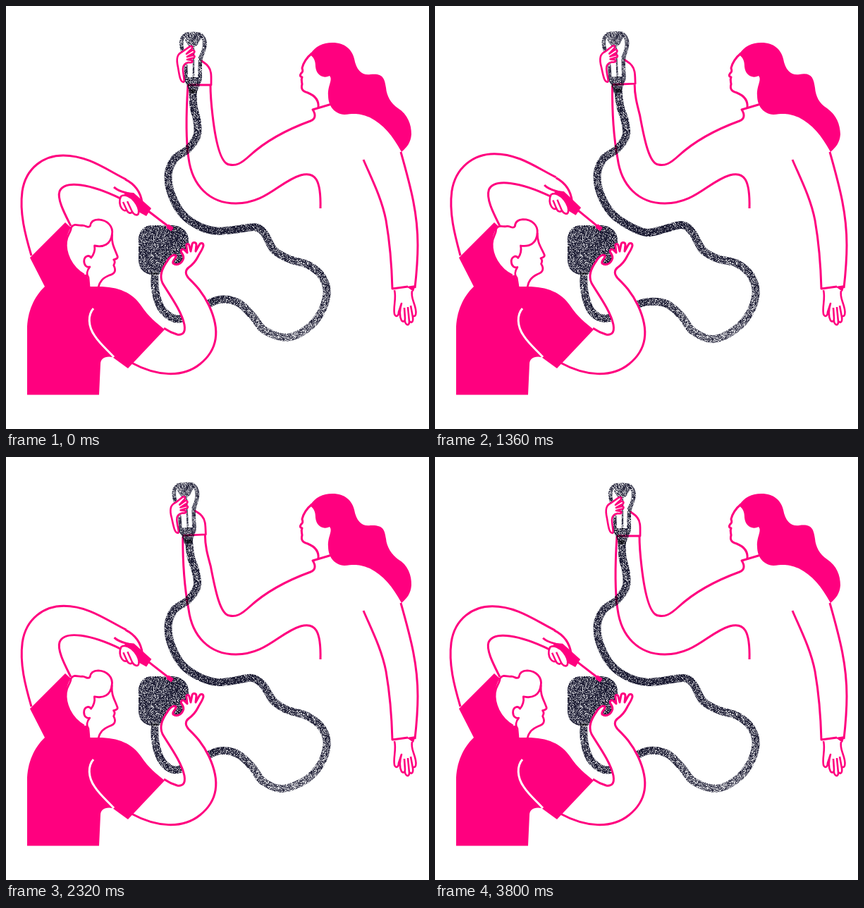
Recreate the animation shown at these times as an HTML page with a canvas. Size 600x600 px, loop 3.84 s.

```html
<!DOCTYPE html>
<html lang="en">
<head>
<meta charset="utf-8">
<title>Lamp and cable</title>
<style>
  html, body { margin: 0; width: 100%; height: 100%; overflow: hidden; background: #fff; }
  canvas { display: block; width: 600px; height: 600px; }
</style>
</head>
<body>
<canvas id="stage" width="600" height="600"></canvas>
<script>
const LOOP = 3840, STEP = 40, TAU = Math.PI * 2;
const PINK = '#ff007f', WHITE = '#fff';
const ctx = document.getElementById('stage').getContext('2d');

// Cable points: rest position and offset at the far end of the sway.
const CABLE = [
  [265, 118, 0, 0], [266, 142, 0, 0], [271, 163, 0, 0], [271, 184, 0, 0],
  [258, 203, 0, 0], [239, 217, -1, 0], [230, 240, 0, 0], [235, 268, 0, -1],
  [251, 296, 0, -2], [275, 313, 2, -1], [300, 319, 1, 3], [327, 317, -2, -1],
  [354, 314, -9, -4], [367, 323, -5, -2], [380, 346, -1, 0], [402, 359, -5, -1],
  [430, 368, -4, -3], [449, 385, -1, -2], [455, 408, 0, 0], [446, 436, 0, 0],
  [427, 458, -3, 1], [399, 470, -12, 3], [367, 460, -4, 1], [350, 440, -1, 0],
  [330, 421, -2, 2], [304, 416, 0, 4], [280, 426, 0, 0], [246, 444, -6, -1],
  [222, 431, -1, 2], [212, 405, 0, 0], [211, 378, 0, 0]
];

// Dark grainy ink, lighter at the lamp and along the lower bend.
function makeInk() {
  const c = document.createElement('canvas');
  c.width = c.height = 600;
  const g = c.getContext('2d'), img = g.createImageData(600, 600);
  const spot = (x, y, cx, cy, r) => Math.exp(-((x - cx) ** 2 + (y - cy) ** 2) / (r * r));
  let seed = 7;
  const rand = () => (seed = (seed * 1664525 + 1013904223) >>> 0) / 4294967296;
  for (let i = 0; i < 360000; i++) {
    const x = i % 600, y = i / 600 | 0;
    const light = 0.27 + 0.2 * spot(x, y, 405, 470, 65) + 0.12 * spot(x, y, 262, 55, 45)
      - 0.1 * spot(x, y, 300, 318, 60);
    const v = rand() ** (1 / light - 1);
    img.data.set([22 + 233 * v, 22 + 233 * v, 46 + 209 * v, 255], i * 4);
  }
  g.putImageData(img, 0, 0);
  return ctx.createPattern(c, 'no-repeat');
}
const ink = makeInk();

function line(d, color = PINK, width = 3) {
  ctx.strokeStyle = color;
  ctx.lineWidth = width;
  ctx.stroke(new Path2D(d));
}
function fill(d, color = PINK) {
  ctx.fillStyle = color;
  ctx.fill(new Path2D(d), 'evenodd');
}
function shape(d, width = 3) {
  fill(d, WHITE);
  line(d, PINK, width);
}
function turned(x, y, angle, draw, dx = 0, dy = 0) {
  ctx.save();
  ctx.translate(x + dx, y + dy);
  ctx.rotate(angle);
  ctx.translate(-x, -y);
  draw();
  ctx.restore();
}
const sway = (t, period, lag = 0) => (1 - Math.cos(TAU * (t - lag) / period)) / 2;

function woman(s, t) {
  const w = 1.2 * Math.sin(TAU * t / 1920);
  line('M434,67 C428,72 422,80 420,88 C421,91 421,93 420,94 C416,98 417,100 420,101 C418,105 420,108 420,111 C418,118 421,121 428,123 C438,127 444,134 443,144');
  fill(`M431,69 C439,57 449,52 463,52 C481,52 491,62 494,75 C497,92 506,99 517,97
    C534,${95 + w} 537,102 539,116 C540,128 ${546 + w},138 556,145
    C570,${154 - w} ${575 + w / 2},168 575,182 C574,194 569,200 561,207
    C548,183 535,168 516,158 C499,151 492,153 480,154 C466,153 457,142 457,127
    C456,113 464,105 459,99 C449,104 440,97 439,86 C439,78 437,73 431,69Z`);
  const x = 290 - 8.5 * s, y = 112 - s;
  line(`M462,139 L435,147 C439,153 440,160 432,163 C399,175 368,192 346,212
    C333,224 326,227 317,225 C304,224 297,190 ${293 - 3 * s},155 C${291 - 6 * s},138 ${x},126 ${x},${y}`);
  line(`M${258 - 8 * s},${112 + s} C${255 - 5 * s},160 ${255 - s},190 259,216
    C264,254 288,280 326,280 C369,280 388,249 418,240 C439,234 447,247 446,287`);
  line('M560,207 C575,260 584,295 584,339 C584,360 582,382 580,400');
  line('M507,218 C519,246 533,273 539,304 C544,333 547,362 548,401 L570,398');
  fill('M568,398 L581,396 L578,405Z');
  line('M551,403 C554,415 549,427 551,437 C553,442 557,440 557,434 L561,422 C558,432 558,440 561,446 C564,449 566,447 566,443 L565,428 M566,443 C565,453 572,455 572,448 L570,427 M572,447 C576,451 578,447 577,441 L574,425 M577,440 C582,441 582,435 581,430 C579,419 574,414 576,404', PINK, 2.6);
}

function inHand(s, draw) {
  turned(274, 112, -0.055 * s, draw, -8.5 * s, -1.5 * s);
}

function palm() {
  line('M258,112 L291,112 C291,101 292,92 287,86 C284,81 279,80 277,77', PINK, 2.8);
}

function lamp() {
  fill('M253,38 Q265,35 277,38 Q285,44 285,54 C284,66 278,72 278,82 L278,106 Q275,110 274,114 L270,124 L260,124 L257,112 L253,107 L253,82 C252,70 246,64 246,53 Q246,43 253,38Z M253,46 C250,53 252,64 257,73 L258,101 L272,101 L273,73 C278,64 281,54 277,46 C274,49 273,55 268,58 L261,58 C256,55 255,49 253,46Z', ink);
  line('M266,58 L266,103', ink, 2.5);
}

function fingers() {
  shape('M252,108 C247,108 246,99 244,87 C241,74 243,68 250,65 C255,62 259,58 262,57 C266,57 264,61 261,63 L256,68 L264,63 C268,62 269,66 264,68 L257,72 L265,70 C269,70 268,74 264,74 L257,76 L263,77 C267,79 263,81 259,80 C254,81 251,84 251,89 C251,97 254,107 252,108Z', 2.6);
}

function cable(s, t) {
  const pts = CABLE.map(([x, y, dx, dy], i) => {
    const hold = Math.max(0, 1 - i / 3);
    return [x + dx * sway(t, 1920, -150) - 6.5 * s * hold,
      y + dy * sway(t, 1920, 150) - 1.5 * s * hold];
  });
  const at = i => pts[Math.max(0, Math.min(pts.length - 1, i))];
  ctx.beginPath();
  ctx.moveTo(...pts[0]);
  for (let i = 0; i < pts.length - 1; i++) {
    const [a, b, c, d] = [at(i - 1), at(i), at(i + 1), at(i + 2)];
    ctx.bezierCurveTo(b[0] + (c[0] - a[0]) / 6, b[1] + (c[1] - a[1]) / 6,
      c[0] - (d[0] - b[0]) / 6, c[1] - (d[1] - b[1]) / 6, c[0], c[1]);
  }
  ctx.strokeStyle = ink;
  ctx.lineWidth = 11;
  ctx.stroke();
}

function device() {
  fill('M207,311 L236,311 C250,312 259,320 259,333 L259,350 C258,360 252,366 242,367 L226,374 Q220,382 209,382 C197,380 188,374 188,360 L188,331 C188,320 195,311 207,311Z', ink);
}

function lowArm() {
  shape('M178,506 C213,525 250,528 275,508 C304,485 302,455 288,425 C278,404 267,394 259,386 C254,380 254,375 259,371 C266,366 269,362 272,356 C275,350 279,345 280,340 C280,336 276,335 274,339 L269,348 L270,339 C270,335 265,334 264,338 L262,348 L260,340 C259,336 255,337 256,341 L257,350 L253,346 C250,343 247,347 249,350 C252,354 253,357 251,360 C248,367 241,368 237,365 C235,361 242,358 241,354 C237,351 231,357 228,363 C222,372 217,382 222,393 C230,407 249,432 253,452 C255,464 250,467 243,466 C236,464 230,461 224,457');
}

function shirt() {
  fill('M34,357 L84,307 L120,340 L118,398 L131,398 C160,398 179,407 191,424 C203,442 213,449 225,459 L173,514 L151,498 C141,496 134,500 134,508 L132,551.5 L30,551.5 L30,459 C30,434 40,412 55,398Z');
  line('M124,429 C116,438 116,454 126,468 C133,479 144,488 153,498', WHITE);
}

function head() {
  fill('M110,381 C92,370 84,349 86,333 C87,323 91,317 94,311 C103,307 109,312 117,314 C121,306 126,303 132,303 C145,304 153,312 151,325 C152,337 153,343 159,356 L154,360 L154,366 L155,375 C153,386 135,384 131,398 L118,397 L115,381Z', WHITE);
  line('M111,381 C92,370 84,349 86,334 C87,324 93,321 93,314 C97,307 103,312 109,311 C114,311 117,316 120,312 C121,305 127,303 132,303 C145,304 153,313 151,324 C149,338 139,343 126,340 C127,346 125,353 121,357 C118,352 111,355 111,362 C111,368 115,371 119,370 C115,375 114,381 117,385 L118,398', PINK, 2.8);
  line('M151,324 C150,338 154,343 158,354 C160,358 157,359 153,360 C156,363 154,366 153,368 C157,376 154,380 147,382 C137,386 133,391 131,399', PINK, 2.8);
}

function highArm(m) {
  line(`M36,354 C${27 + m},324 ${19 + m},293 ${23 + m},263 C${28 + m},229 ${54 + m},${212 - 3 * m} ${81 + 4 * m},${212 - 3 * m}
    C${116 + 3 * m},${212 - 3 * m} ${142 + 2 * m},${232 - 4 * m} ${170 + 2 * m},${246 - 4 * m}`);
  line(`M92,312 C84,296 72,274 ${76 + m / 2},${263 - 3 * m} C${83 + m},${246 - 3 * m} ${121 + m},${253 - 4 * m} ${162 + 2 * m},${273 - 4 * m}`);
}

function driver() {
  line('M169,246 C183,253 191,264 193,279 M153,257 C160,264 169,264 177,267');
  fill('M168,264 L181,265 L206,287 L199,298 L188,292 L168,275Z');
  shape('M163,270 C160,276 161,283 164,287 C167,291 170,291 171,289 C173,294 177,295 179,292 C182,297 187,298 188,294 C189,289 186,282 182,277 C177,271 168,266 163,270Z', 2.6);
  line('M171,289 L166,278 M179,292 L172,277', PINK, 2.4);
  line('M202,291 L236,317');
  line('M229,312 L236,317', PINK, 6);
}

function draw(t) {
  const s = sway(t, LOOP), m = sway(t, 1920, 100), nod = sway(t, 1920, 180);
  ctx.globalCompositeOperation = 'source-over';
  ctx.fillStyle = WHITE;
  ctx.fillRect(0, 0, 600, 600);
  ctx.lineCap = 'butt';
  ctx.lineJoin = 'round';
  woman(s, t);
  inHand(s, palm);
  ctx.globalCompositeOperation = 'multiply';
  cable(s, t);
  inHand(s, lamp);
  device();
  ctx.globalCompositeOperation = 'source-over';
  inHand(s, fingers);
  lowArm();
  highArm(m);
  shirt();
  turned(124, 397, -0.09 * nod, head);
  turned(237, 317, 0.045 * m, driver);
}

const start = performance.now();
function tick(now) {
  const t = Math.max(0, now - start) % LOOP;
  draw(Math.floor(t / STEP) * STEP);
  requestAnimationFrame(tick);
}
draw(0);
requestAnimationFrame(tick);
</script>
</body>
</html>
```
